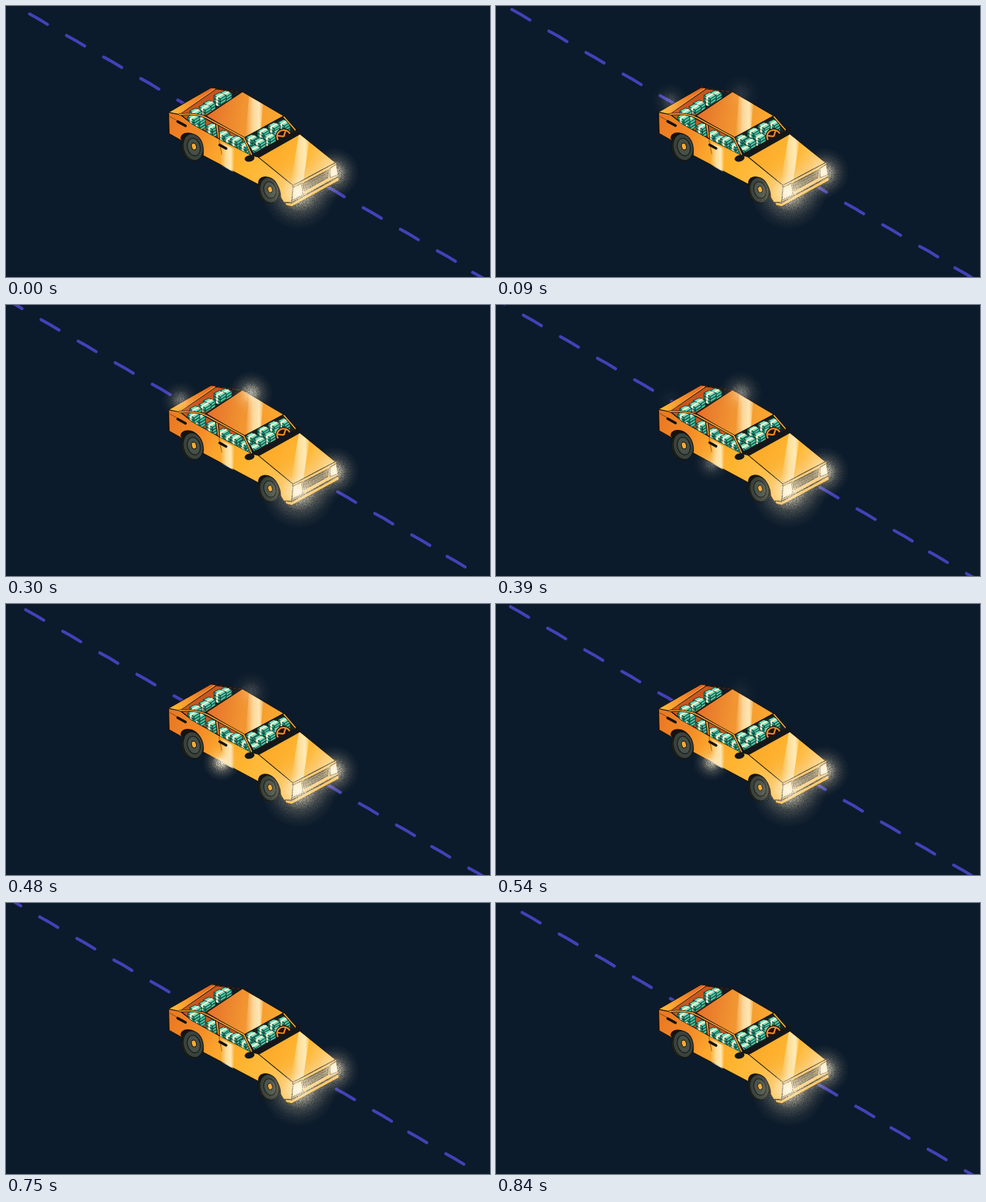
These frames come from a looping animation (680 by 382 pixels, 0.87 s). An HTML page:

```html
<!DOCTYPE html>
<html lang="en">
<head>
<meta charset="utf-8">
<title>Night drive</title>
<style>
html, body { margin: 0; width: 100%; height: 100%; overflow: hidden; background: #0c1b2b; }
svg { display: block; width: 100vw; height: 100vh; }
.ink { stroke: #17140f; stroke-width: 1.1; stroke-linejoin: round; }
.line { fill: none; stroke: #17140f; stroke-width: 1; stroke-linecap: round; stroke-linejoin: round; }
</style>
</head>
<body>
<svg viewBox="0 0 680 382">
  <defs>
    <linearGradient id="side" gradientUnits="userSpaceOnUse" x1="229" y1="160" x2="404" y2="240">
      <stop offset="0" stop-color="#ea7823"/><stop offset=".25" stop-color="#f38a26"/>
      <stop offset=".42" stop-color="#fba52d"/><stop offset=".62" stop-color="#ffb32d"/>
      <stop offset="1" stop-color="#ffc454"/>
    </linearGradient>
    <linearGradient id="roof" gradientUnits="userSpaceOnUse" x1="284" y1="150" x2="391" y2="165">
      <stop offset="0" stop-color="#e5702a"/><stop offset=".45" stop-color="#f19331"/>
      <stop offset="1" stop-color="#fbab2f"/>
    </linearGradient>
    <linearGradient id="hood" gradientUnits="userSpaceOnUse" x1="370" y1="205" x2="445" y2="240">
      <stop offset="0" stop-color="#fdab2a"/><stop offset=".6" stop-color="#ffb733"/>
      <stop offset="1" stop-color="#ffd078"/>
    </linearGradient>
    <linearGradient id="deck" gradientUnits="userSpaceOnUse" x1="229" y1="150" x2="292" y2="116">
      <stop offset="0" stop-color="#ffbd3c"/><stop offset=".4" stop-color="#f9982c"/>
      <stop offset="1" stop-color="#dd5f1f"/>
    </linearGradient>
    <linearGradient id="shine">
      <stop offset="0" stop-color="#fff0c4" stop-opacity="0"/>
      <stop offset=".4" stop-color="#fff0c4" stop-opacity=".7"/>
      <stop offset=".72" stop-color="#fff0c4" stop-opacity=".9"/>
      <stop offset="1" stop-color="#fff0c4" stop-opacity="0"/>
    </linearGradient>
    <radialGradient id="glow">
      <stop offset="0" stop-color="#fffaf0"/><stop offset=".22" stop-color="#fff1cf" stop-opacity=".75"/>
      <stop offset=".5" stop-color="#f3dfb8" stop-opacity=".28"/>
      <stop offset=".78" stop-color="#e6d3b0" stop-opacity=".08"/>
      <stop offset="1" stop-color="#e6d3b0" stop-opacity="0"/>
    </radialGradient>
    <filter id="grain" filterUnits="userSpaceOnUse" x="190" y="70" width="330" height="260" color-interpolation-filters="sRGB">
      <feTurbulence type="fractalNoise" baseFrequency=".85" numOctaves="2" seed="4"/>
      <feColorMatrix values="0 0 0 0 1  0 0 0 0 1  0 0 0 0 1  0 0 0 3 -1" result="n"/>
      <feComposite in="SourceGraphic" in2="n" operator="arithmetic" k1=".6" k2=".65"/>
    </filter>
    <clipPath id="roofClip"><path d="M333 123L391 156L335 186L282 156Z"/></clipPath>
    <clipPath id="hoodClip"><path d="M356 214L413 182L464 222L404 254Z"/></clipPath>
    <clipPath id="rearClip"><path d="M296 118L331 123L281 154L246 153Z"/></clipPath>
    <clipPath id="doorClip"><path d="M246 154Q270 153 283 161L336 188L347 212L298 187L262 167Z"/></clipPath>
    <clipPath id="frontClip"><path d="M391 158L411 180L352 212L336 187Z"/></clipPath>
  </defs>

  <rect width="680" height="382" fill="#0c1b2b"/>
  <g id="road" fill="none" stroke="#4341b8" stroke-width="4.3" stroke-linecap="round"></g>

  <g id="body">
    <!-- shell -->
    <path class="ink" fill="url(#side)" d="M229 151L244 153L262 167L298 187L347 212L356 214L404 254L402 278L391 278L386 270L356 253L278 212L246 190L230 181Z"/>
    <path class="ink" fill="url(#deck)" d="M229 151L289 116L333 122L281 156L244 154Z"/>
    <path fill="#16120f" d="M246 188C246 176 268 176 275 193Q280 203 278 213L262 212Z"/>
    <path fill="#16120f" d="M355 253C354 238 372 238 380 250Q388 260 387 272L370 270Z"/>

    <!-- cabin -->
    <path class="ink" fill="#c9561f" d="M296 118L331 123L281 154L246 153Z"/>
    <path fill="#141b24" d="M315 121L331 123L281 154L272 153Z"/>
    <g id="rear" clip-path="url(#rearClip)"></g>
    <path class="ink" fill="#c8571e" d="M246 154Q270 153 283 161L336 188L347 212L298 187L262 167Z"/>
    <g id="doors" clip-path="url(#doorClip)"></g>
    <path fill="#f68e24" class="ink" stroke-width=".7" d="M295 167L299 169L301 189L298 187Z"/>
    <path class="ink" fill="#18251f" d="M391 157L412 180L352 213L335 187Z"/>
    <g clip-path="url(#frontClip)">
      <g id="front"></g>
      <ellipse cx="391" cy="185" rx="9.5" ry="9" fill="#1c120b" stroke="#1c120b" stroke-width="4.6"/>
      <path d="M391 185L394 176M391 185L382 184M391 185L400 187" stroke="#ee8a2c" stroke-width="2.2"/>
      <ellipse cx="391" cy="185" rx="9.5" ry="9" fill="none" stroke="#ee8a2c" stroke-width="2.2"/>
    </g>

    <!-- roof -->
    <path class="ink" fill="url(#roof)" d="M333 122L391 156L335 187L282 156Z"/>
    <g clip-path="url(#roofClip)"><path fill="url(#shine)" d="M343 118H364L358 187H337Z"/></g>
    <path d="M244 154Q270 152 283 159L335 187L346 211" fill="none" stroke="#17140f" stroke-width="3.2"/>
    <path d="M244 154Q270 152 283 159L335 187L346 211" fill="none" stroke="#fba430" stroke-width="1.7"/>
    <path d="M391 157L411 180" stroke="#17140f" stroke-width="3.4"/>
    <path d="M391 157L411 180" stroke="#ffad35" stroke-width="1.6"/>
    <path d="M246 152L294 118" stroke="#f99a32" stroke-width="1.4"/>

    <!-- hood and nose -->
    <path class="ink" fill="url(#hood)" d="M355 214L413 181L464 222L404 254Z"/>
    <g clip-path="url(#hoodClip)"><path fill="url(#shine)" d="M413 178H429L418 250H401Z"/></g>
    <path fill="#14171a" d="M348 209L405 178L414 182L356 215Z"/>
    <path class="ink" fill="#ffc257" d="M404 254L465 221L468 241L402 278Z"/>
    <path class="ink" fill="#6a6048" d="M418 251L454 232L453 243L419 262Z"/>
    <path d="M419 255L453 236M419 259L453 240" stroke="#3c382d" stroke-width=".8"/>
    <path class="ink" fill="#fff0c8" d="M404 257L416 251L418 267L403 275Z"/>
    <path class="ink" fill="#fff0c8" d="M456 230L465 224L467 239L456 243Z"/>
    <path class="ink" stroke-width=".7" fill="#ffb935" d="M393 278L402 279L468 242L469 247L402 284L394 282Z"/>

    <!-- trim -->
    <path fill="url(#shine)" d="M302 192L322 203L320 235L302 225Z"/>
    <path class="line" d="M300 190L304 210M231 157L244 164" opacity=".45"/>
    <path d="M242 164L253 170M301 197L310 202" stroke="#14120f" stroke-width="3.6" stroke-linecap="round"/>
    <path d="M229 153V180" stroke="#17140f" stroke-width="2"/>
    <ellipse cx="343" cy="216" rx="7" ry="4.5" transform="rotate(-12 343 216)" fill="#14171a"/>
    <ellipse cx="411" cy="177" rx="3.6" ry="5.2" transform="rotate(15 411 177)" fill="#14171a"/>
  </g>

  <g id="wheels"></g>

  <g filter="url(#grain)">
    <circle cx="411" cy="263" r="53" fill="url(#glow)" opacity=".85"/>
    <circle cx="461" cy="235" r="36" fill="url(#glow)" opacity=".8"/>
    <ellipse cx="437" cy="253" rx="52" ry="36" transform="rotate(-30 437 253)" fill="url(#glow)" opacity=".32"/>
  </g>
  <g id="flares" filter="url(#grain)"></g>
</svg>

<script>
const LOOP = 870, STEP = 30;
const GAP_X = 52.1, GAP_Y = 30.35;
const $ = id => document.getElementById(id);
const fill = (id, list, draw) => { $(id).innerHTML = list.map(draw).join(''); };

// a pile of n banknote bundles; x, y is the centre of its top face
function pile([x, y, n]) {
  let s = '';
  for (let i = n - 1; i >= 0; i--) {
    s += `<g transform="translate(${x} ${y + i * 4.2})" stroke="#12352f" stroke-width=".9" stroke-linejoin="round">
      <path fill="#2fa487" d="M-8 -1L1 4V8L-8 3Z"/>
      <path fill="#45c3a0" d="M1 4L9 -1V3L1 8Z"/>
      <path fill="#6fe0bd" d="M-8 -1L0 -5L9 -1L1 4Z"/>
      <path fill="#fff0d0" stroke="none" d="M-5 1L3.5 -3.6L6 -2.4L-2.4 2.3V6L-5 4.6Z"/></g>`;
  }
  return s;
}

fill('rear', [[309, 125, 2], [301, 128, 3], [286, 139, 3], [280, 144, 2], [267, 150, 2]], pile);
fill('doors', [[266, 148, 2], [272, 161, 3], [264, 158, 2], [290, 171, 3],
  [306, 181, 3], [315, 188, 2], [324, 189, 3], [337, 197, 3]], pile);
fill('front', [[391, 166, 3], [377, 170, 3], [362, 177, 3], [346, 187, 3],
  [384, 179, 2], [371, 185, 3], [357, 192, 3], [350, 202, 2]], pile);

// the far dashes sit slightly closer
fill('road', [...Array(17).keys()], i => {
  const k = i - 1, x = 33 + k * GAP_X - (k > 11 ? 2.6 : 0), y = 11.2 + k * GAP_Y;
  return `<path d="M${x} ${y}l13 7.2l12.4 7.6"/>`;
});

fill('wheels', [[263, 199, 1.06], [370, 259.5, 1]], ([x, y, s]) =>
  `<g transform="translate(${x} ${y}) rotate(-14) scale(${s})" stroke="#12140f" stroke-width="1">
    <ellipse cx="-2.2" cy=".3" rx="13.2" ry="18" fill="#20251f"/>
    <ellipse rx="13" ry="18" fill="#39423d"/>
    <ellipse cx=".8" rx="8.4" ry="11.8" fill="#465049"/>
    <ellipse cx="1.2" cy="-.6" rx="3.2" ry="4.6" fill="#f9ab31"/></g>`);

// x, y, radius, then start, peak and end in ms
const flares = [
  [245, 134, 28, 60, 180, 400],
  [344, 124, 32, 70, 220, 560],
  [303, 223, 27, 340, 480, 740]
];
fill('flares', flares, ([x, y, r]) =>
  `<circle cx="${x}" cy="${y}" r="${r}" fill="url(#glow)" opacity="0"/>`);

const pulse = (t, a, peak, b) =>
  Math.max(0, t < peak ? (t - a) / (peak - a) : (b - t) / (b - peak));

function draw(t) {
  const p = t / LOOP;
  $('road').setAttribute('transform', `translate(${-2 * GAP_X * p} ${-2 * GAP_Y * p})`);
  // the tail lifts while the nose stays put
  const k = 0.0065 * (1 - Math.cos(2 * Math.PI * p));
  $('body').setAttribute('transform', `matrix(1 ${k} 0 1 -0.8 ${-1.1 - 450 * k})`);
  flares.forEach(([, , , a, peak, b], i) =>
    $('flares').children[i].setAttribute('opacity', 0.9 * pulse(t, a, peak, b)));
}

function tick() {
  const now = (performance.now() + 1) % LOOP;
  draw(Math.floor(now / STEP) * STEP);
  requestAnimationFrame(tick);
}
tick();
</script>
</body>
</html>
```
